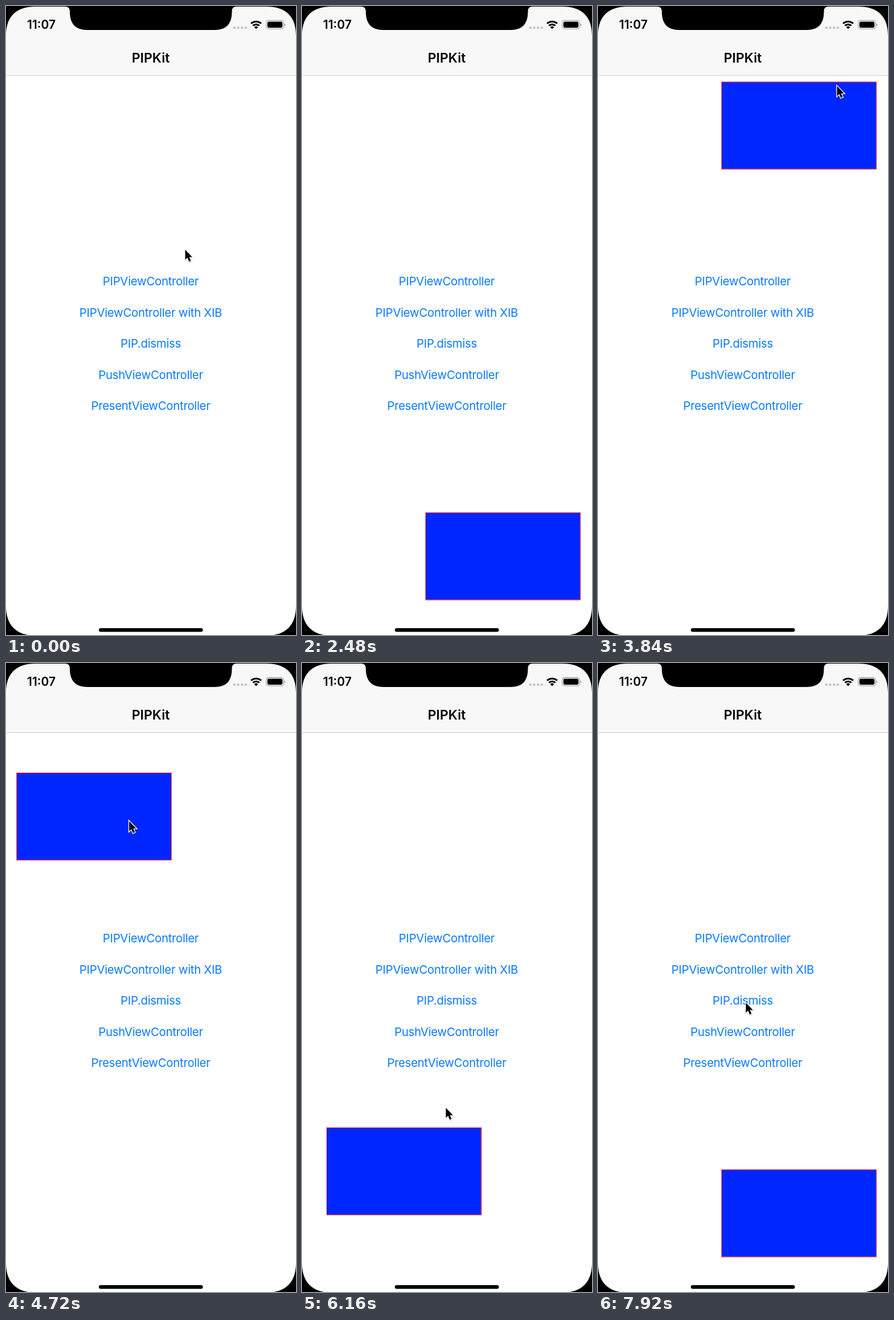
These frames come from a looping animation (509 px wide and 1101 px high, 8 s). An HTML page:

```html
<!DOCTYPE html>
<html lang="en">
<head>
<meta charset="utf-8">
<title>Picture in picture demo</title>
<style>
  html, body { margin: 0; width: 100%; height: 100%; overflow: hidden; background: #fff; }
  svg { display: block; width: 509px; height: 1101px; overflow: hidden; }
  text { font-family: Inter, Roboto, "Liberation Sans", sans-serif; text-anchor: middle; }
  .links text { font-size: 20.4px; letter-spacing: -0.3px; fill: #0a7aff; }
  .title { font-size: 23px; font-weight: 600; }
  .clock { font-size: 21px; font-weight: 600; }

  /* One percent of the loop is one 80 ms step. */
  .pip, .fade, .pressed, .cursor { animation: 8s -8ms infinite; }
  .pip { animation-name: drag; }
  .fade { animation-name: appear; }
  .pressed { animation-name: press; }
  .cursor { animation-name: point; }

  @keyframes appear {
    0%, 23% { opacity: 0; animation-timing-function: steps(4); }
    27%, 100% { opacity: 1; }
  }
  @keyframes press {
    0%, 22% { opacity: 1; animation-timing-function: steps(1); }
    23% { opacity: .25; animation-timing-function: steps(3); }
    26%, 100% { opacity: 1; }
  }
  @keyframes drag {
    0%, 34% { translate: 216.5px 886.5px; animation-timing-function: steps(7); }
    41% { translate: 207px 427px; animation-timing-function: steps(1); }
    42% { translate: 207px 427px; animation-timing-function: steps(2); }
    44% { translate: 216.5px 484.5px; animation-timing-function: steps(1); }
    45% { translate: 216.5px 484.5px; animation-timing-function: steps(2); }
    47% { translate: 216.5px 150px; animation-timing-function: steps(1); }
    48% { translate: 216.5px 132.5px; animation-timing-function: steps(1); }
    49% { translate: 216.5px 132.5px; animation-timing-function: steps(6); }
    55% { translate: 54.5px 79.5px; animation-timing-function: steps(2); }
    57% { translate: 18.5px 132.5px; animation-timing-function: steps(1); }
    58% { translate: 18.5px 132.5px; animation-timing-function: steps(6); }
    64% { translate: 17px 489px; animation-timing-function: steps(2); }
    66% { translate: 18.5px 484.5px; animation-timing-function: steps(2); }
    68% { translate: 18.5px 484.5px; animation-timing-function: steps(5); }
    73% { translate: 57px 880px; animation-timing-function: steps(2); }
    75% { translate: 18.5px 886.5px; animation-timing-function: steps(1); }
    76% { translate: 18.5px 886.5px; animation-timing-function: steps(1); }
    77% { translate: 42.5px 813px; animation-timing-function: steps(5); }
    82% { translate: 190px 372px; animation-timing-function: steps(2); }
    84% { translate: 216.5px 484.5px; animation-timing-function: steps(4); }
    88% { translate: 216.5px 484.5px; animation-timing-function: steps(6); }
    94% { translate: 145px 930px; animation-timing-function: steps(2); }
    96%, 100% { translate: 216.5px 886.5px; }
  }
  @keyframes point {
    0% { translate: 313px 424px; animation-timing-function: steps(1); }
    1% { translate: 296px 470px; animation-timing-function: steps(2); }
    3% { translate: 145px 624px; animation-timing-function: steps(2); }
    5%, 6% { translate: 306px 457px; animation-timing-function: steps(2); }
    8%, 12% { translate: 302px 457px; animation-timing-function: steps(3); }
    15%, 23% { translate: 286px 476px; animation-timing-function: steps(3); }
    26% { translate: 335px 390px; animation-timing-function: steps(3); }
    29% { translate: 480px 48px; animation-timing-function: steps(2); }
    31% { translate: 515px 60px; animation-timing-function: steps(1); }
    32% { translate: 500px 860px; animation-timing-function: steps(1); }
    33% { translate: 440px 915px; animation-timing-function: steps(1); }
    34% { translate: 390px 935px; animation-timing-function: steps(7); }
    41% { translate: 380px 476px; animation-timing-function: steps(3); }
    44% { translate: 400px 590px; animation-timing-function: steps(1); }
    45% { translate: 410px 620px; animation-timing-function: steps(2); }
    47% { translate: 417px 230px; animation-timing-function: steps(1); }
    48% { translate: 418px 137.5px; animation-timing-function: steps(1); }
    49% { translate: 405px 190px; animation-timing-function: steps(6); }
    55% { translate: 243px 137px; animation-timing-function: steps(2); }
    57% { translate: 225px 200px; animation-timing-function: steps(1); }
    58% { translate: 215px 215px; animation-timing-function: steps(6); }
    64% { translate: 213px 571px; animation-timing-function: steps(3); }
    67% { translate: 172px 590px; animation-timing-function: steps(1); }
    68% { translate: 183px 640px; animation-timing-function: steps(5); }
    73% { translate: 210px 1000px; animation-timing-function: steps(2); }
    75% { translate: 220px 960px; animation-timing-function: steps(1); }
    76% { translate: 225px 900px; animation-timing-function: steps(1); }
    77% { translate: 251px 776px; animation-timing-function: steps(5); }
    82% { translate: 385px 400px; animation-timing-function: steps(2); }
    84% { translate: 365px 500px; animation-timing-function: steps(2); }
    86% { translate: 334px 566px; animation-timing-function: steps(2); }
    88% { translate: 345px 580px; animation-timing-function: steps(6); }
    94% { translate: 273px 1026px; animation-timing-function: steps(5); }
    99%, 100% { translate: 258px 592px; }
  }
</style>
</head>
<body>
<svg viewBox="0 0 509 1101">
  <rect width="509" height="1101" fill="#fff"/>
  <rect width="509" height="121" fill="#f9f8f9"/>
  <rect y="121" width="509" height="1" fill="#cbcbcd"/>
  <text class="title" x="254" y="99">PIPKit</text>

  <g class="links">
    <text class="pressed" x="254" y="489">PIPViewController</text>
    <text x="254" y="543.5">PIPViewController with XIB</text>
    <text x="254" y="598">PIP.dismiss</text>
    <text x="254" y="652.5">PushViewController</text>
    <text x="254" y="707">PresentViewController</text>
  </g>

  <g class="pip">
    <g class="fade">
      <rect width="272.5" height="153.5" fill="#dc1432"/>
      <rect x="1.2" y="1.2" width="270.1" height="151.1" fill="#0026ff"/>
    </g>
  </g>

  <!-- Status bar -->
  <text class="clock" x="62" y="40">11:07</text>
  <path d="M401 38H421" stroke="#c6c6c6" stroke-width="4.6" stroke-linecap="round" stroke-dasharray="0 6.6"/>
  <g fill="none" stroke="#000" stroke-width="3">
    <path d="M430.1 30.7A13 13 0 0 1 447.9 30.7"/>
    <path d="M433.4 34.4A8.2 8.2 0 0 1 444.6 34.4"/>
  </g>
  <path d="M439 40.5L435.6 36.9A5 5 0 0 1 442.4 36.9Z"/>
  <rect x="456.7" y="25.5" width="30.6" height="14.4" rx="4.2" fill="none" stroke="#a3a3a3" stroke-width="1.3"/>
  <rect x="458.8" y="27.5" width="26.4" height="10.4" rx="2.4"/>
  <path d="M488.5 30.4Q490.6 31.2 490.6 32.7T488.5 35Z" fill="#a3a3a3"/>

  <!-- Device edge, notch and home bar -->
  <path fill-rule="evenodd" d="M-1 -1H510V1104H-1Z
    M0 52V1050C0 1084 18 1102 52 1102H457C491 1102 509 1084 509 1050V52C509 18 491 1 457 1
    H405C399 1 396.5 4 396.5 10C396.5 31 387 42 366 42H143C122 42 112 31 112 10C112 4 109.500 1 103.500 1
    H52C18 1 0 18 0 52Z"/>
  <rect x="163" y="1089" width="182.500" height="6.500" rx="3.250"/>

  <g class="cursor">
    <path d="M2 4V21.500L5.800 18L8.700 25L12 23.600L9.100 16.800H14.500Z" fill="#000" opacity=".14" stroke="#000" stroke-width="2.500" stroke-linejoin="round"/>
    <path d="M1.500 2.600V20.200L5.400 16.600L8.300 23.400L11.500 22L8.600 15.400H13.900Z" stroke="#fff" stroke-width="2.600" paint-order="stroke"/>
  </g>
</svg>
</body>
</html>
```
